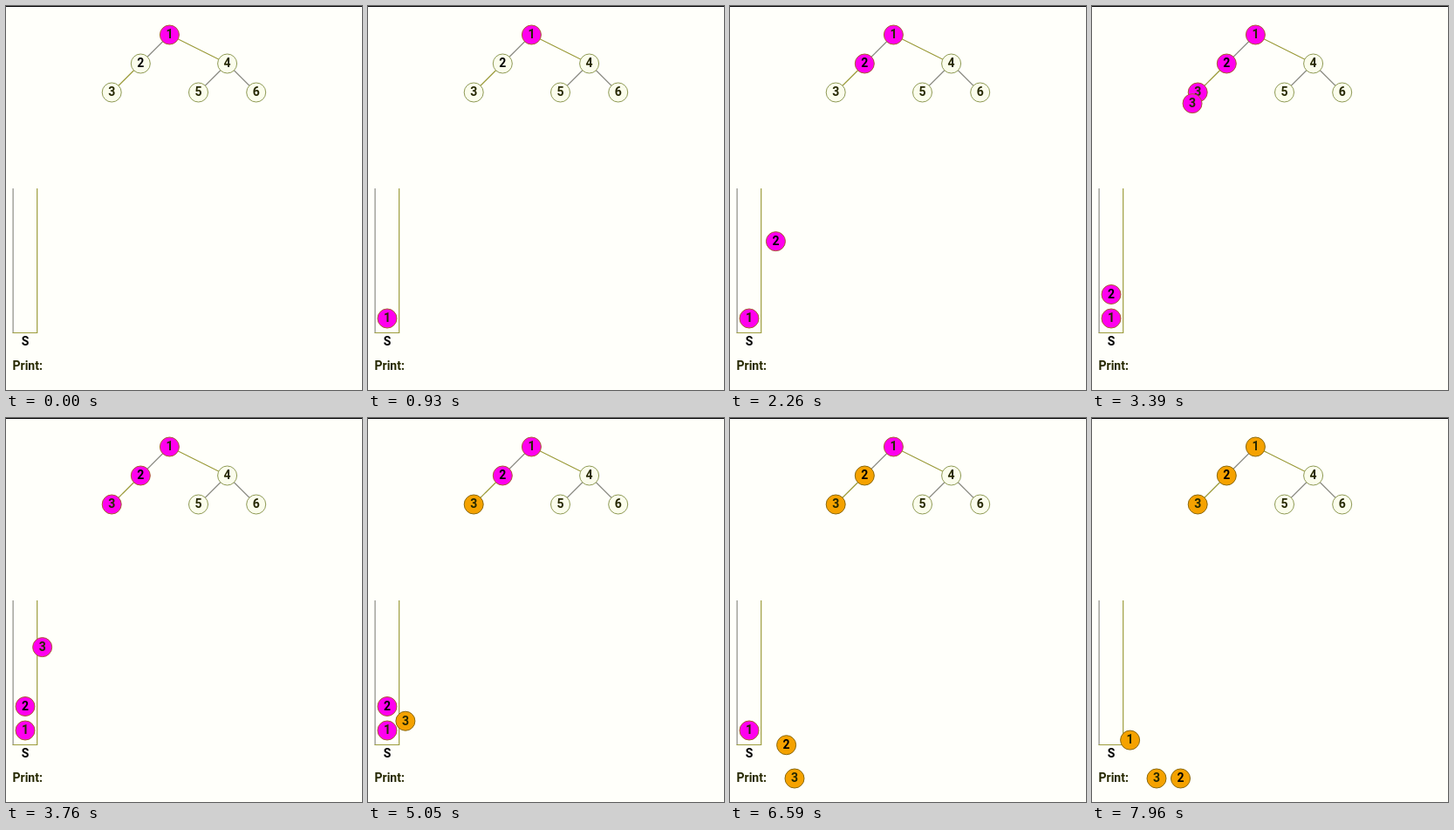
Write an HTML page that moves like this. It is 408 px wide and 440 px high and loops after 8000 ms.

```html
<!DOCTYPE html>
<html lang="en">
<head>
<meta charset="utf-8">
<title>Tree traversal with a stack</title>
<style>
  html, body { margin: 0; width: 100%; height: 100%; overflow: hidden; background: #fffffa; }
  svg { display: block; width: 408px; height: 440px; }
  text { font: bold 14px Roboto, Arial, sans-serif; fill: #262800; }
  .mid { text-anchor: middle; }
  .dark { fill: #000; }
  .line { fill: none; stroke: #8c8c84; stroke-width: 1.2; }
  .olive { stroke: #9c9c3c; }
</style>
</head>
<body>
<svg id="stage" viewBox="0 0 408 440">
  <rect width="408" height="1" fill="#000"/>
  <g id="edges"></g>
  <path class="line" d="M8.1 209V374.5"/>
  <path class="line olive" d="M7.5 374.5H35.7V209"/>
  <text class="mid dark" x="22" y="389">S</text>
  <text x="7.5" y="417">Print:</text>
  <g id="nodes"></g>
  <g id="balls"></g>
</svg>
<script>
const LOOP = 8000, MOVE = 500;
const PLAIN = { fill: '#fbfdec', stroke: '#8f9a55' };
const PUSHED = { fill: '#ff00ee', stroke: '#a8622e' };
const POPPED = { fill: '#f5a200', stroke: '#8a6a10' };

const tree = {
  1: [187.4, 33], 2: [154.3, 66], 3: [121.2, 99],
  4: [253.6, 66], 5: [220.5, 99], 6: [286.7, 99]
};
const edges = [[1, 2], [2, 3], [1, 4], [4, 5], [4, 6]];

// mark/push: highlighted, then moved to the stack; visit/pop: recoloured, then printed
const steps = {
  1: { mark: 0, push: 410, visit: 7390, pop: 7860, slot: [22, 358], out: [129, 413] },
  2: { mark: 1420, push: 1876, visit: 5860, pop: 6323, slot: [22, 330.5], out: [101.5, 413] },
  3: { mark: 2910, push: 3360, visit: 4360, pop: 4850, slot: [22, 303], out: [74, 413] }
};

const $ = id => document.getElementById(id);

function add(parent, tag, attrs) {
  const el = document.createElementNS('http://www.w3.org/2000/svg', tag);
  for (const key in attrs) el.setAttribute(key, attrs[key]);
  return parent.appendChild(el);
}

function makeDisc(parent, label) {
  const group = add(parent, 'g', {});
  const circle = add(group, 'circle', { r: 11 });
  const cls = label == 2 ? 'mid dark' : 'mid';
  add(group, 'text', { y: 4.3, class: cls }).textContent = label;
  return { group, circle };
}

function place(disc, [x, y]) {
  disc.group.setAttribute('transform', `translate(${x} ${y})`);
}

function paint(disc, look) {
  disc.circle.setAttribute('fill', look.fill);
  disc.circle.setAttribute('stroke', look.stroke);
}

function glide(from, to, start, t) {
  const p = Math.min(1, Math.max(0, (t - start) / MOVE));
  return from.map((v, i) => v + (to[i] - v) * p);
}

for (const [a, b] of edges) {
  const [x1, y1] = tree[a], [x2, y2] = tree[b];
  const olive = b === 3 || b === 4;
  add($('edges'), 'line', { x1, y1, x2, y2, class: olive ? 'line olive' : 'line' });
}

const nodes = {}, balls = {};
for (const id in tree) {
  nodes[id] = makeDisc($('nodes'), id);
  place(nodes[id], tree[id]);
  paint(nodes[id], PLAIN);
}
for (const id in steps) balls[id] = makeDisc($('balls'), id);

function draw(t) {
  for (const id in steps) {
    const s = steps[id], ball = balls[id];
    const look = t >= s.visit ? POPPED : t >= s.mark ? PUSHED : PLAIN;
    paint(nodes[id], look);
    paint(ball, look);
    ball.group.setAttribute('visibility', t >= s.push ? 'visible' : 'hidden');
    place(ball, t < s.pop ? glide(tree[id], s.slot, s.push, t) : glide(s.slot, s.out, s.pop, t));
  }
}

const begin = performance.now();
function tick() {
  draw((performance.now() - begin) % LOOP);
  requestAnimationFrame(tick);
}
draw(0);
requestAnimationFrame(tick);
</script>
</body>
</html>
```
